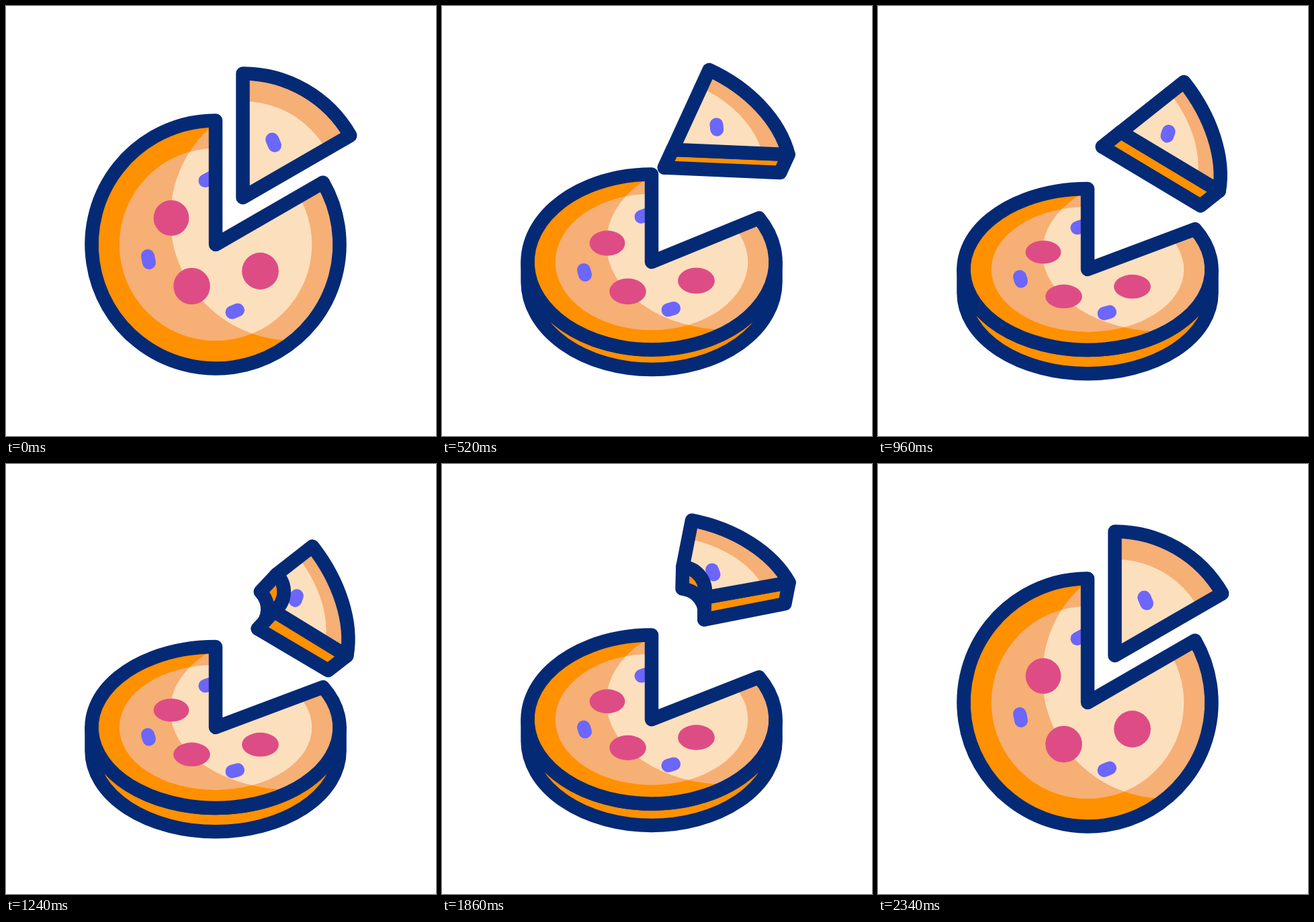
Recreate the animation shown at these times as an HTML page with a canvas. Size 640 by 640 pixels, loop 2400 ms.

```html
<!DOCTYPE html>
<html lang="en">
<head>
<meta charset="utf-8">
<title>Pizza</title>
<style>
  html, body { margin: 0; width: 100%; height: 100%; overflow: hidden; background: #fff; }
  canvas { display: block; }
</style>
</head>
<body>
<canvas id="stage" width="640" height="640"></canvas>
<script>
const ctx = document.getElementById('stage').getContext('2d');
const LOOP = 2400, RADIUS = 184.5, CHEESE = 143.3, LINE = 20.5, THICKNESS = 35.3;
const NAVY = '#042a76', CRUST = '#ff9000', TAN = '#f6af74', CREAM = '#fcdfbd',
      PINK = '#de4c85', BLUE = '#6c66fa';
const UP = -Math.PI / 2, RIGHT = -Math.PI / 6, TAU = Math.PI * 2;
const EDGE_X = RADIUS * Math.cos(RIGHT), EDGE_Y = RADIUS * Math.sin(RIGHT);

let squash = 1, depth = 0;

function ease(t, start, end) {
  const u = Math.min(1, Math.max(0, (t - start) / (end - start)));
  return u * u * (3 - 2 * u);
}

// Path helpers work in flat pizza coordinates; only y is squashed, line widths stay.
const arc = (path, r, from, to, ccw = false, dy = 0) =>
  path.ellipse(0, dy, r, r * squash, 0, from, to, ccw);

function disc(x, y, r, color) {
  ctx.fillStyle = color;
  ctx.beginPath();
  ctx.ellipse(x, y * squash, r, r * squash, 0, 0, TAU);
  ctx.fill();
}

function pill(x1, y1, x2, y2) {
  ctx.strokeStyle = BLUE;
  ctx.lineWidth = 20;
  ctx.beginPath();
  ctx.moveTo(x1, y1 * squash);
  ctx.lineTo(x2, y2 * squash);
  ctx.stroke();
}

function outline(path) {
  ctx.strokeStyle = NAVY;
  ctx.lineWidth = LINE;
  ctx.stroke(path);
}

function wall(path) {
  path.closePath();
  ctx.fillStyle = CRUST;
  ctx.fill(path);
  outline(path);
}

function topFace(path, drawInside) {
  path.closePath();
  ctx.save();
  ctx.clip(path);
  drawInside();
  ctx.restore();
  outline(path);
}

function drawPizza(y) {
  ctx.save();
  ctx.translate(312, y);

  if (depth > 0.1) {
    const side = new Path2D();
    arc(side, RADIUS, Math.PI, 0, true);
    arc(side, RADIUS, 0, Math.PI, false, depth);
    wall(side);
  }

  const face = new Path2D();
  face.moveTo(0, 0);
  arc(face, RADIUS, RIGHT, UP + TAU);
  topFace(face, () => {
    disc(0, 0, RADIUS, CRUST);
    disc(0, 0, CHEESE, TAN);
    const light = new Path2D();
    light.ellipse(115, -39.5 * squash, 182.5, 182.5 * squash, 0, 0, TAU);
    ctx.save();
    ctx.clip(light);
    disc(0, 0, RADIUS, TAN);
    disc(0, 0, CHEESE, CREAM);
    ctx.restore();
    disc(-66, -39.5, 26.4, PINK);
    disc(-35.5, 62, 27.3, PINK);
    disc(66.5, 39.5, 27.4, PINK);
    pill(-101, 17, -99, 27);
    pill(24.5, 101, 33, 97.5);
    pill(-15.5, -95, -6, -100);
  });
  ctx.restore();
}

function drawSlice(x, y, angle, bite) {
  ctx.save();
  ctx.translate(x, y);
  ctx.rotate(angle);
  ctx.translate(-80, 92 * squash);

  const at = (px, py, low = 0) =>
    [px * bite + low * 5.5 * bite, py * bite * squash + low * depth];
  const left = low => at(0, -81, low);
  const front = low => at(41, -24, low);
  const bend1 = low => at(22, -84, low);
  const bend2 = low => at(41, -60, low);

  if (depth > 0.1) {
    const bitten = new Path2D();
    bitten.moveTo(...left(0));
    bitten.bezierCurveTo(...bend1(0), ...bend2(0), ...front(0));
    bitten.lineTo(...front(1));
    bitten.bezierCurveTo(...bend2(1), ...bend1(1), ...left(1));
    wall(bitten);

    const side = new Path2D();
    side.moveTo(...front(0));
    side.lineTo(EDGE_X, EDGE_Y * squash);
    side.lineTo(EDGE_X, EDGE_Y * squash + depth);
    side.lineTo(...front(1));
    wall(side);
  }

  const face = new Path2D();
  arc(face, RADIUS, UP, RIGHT);
  face.lineTo(...front(0));
  face.bezierCurveTo(...bend2(0), ...bend1(0), ...left(0));
  topFace(face, () => {
    disc(0, 0, RADIUS, TAN);
    disc(0, 0, CHEESE, CREAM);
    pill(43.7, -86.5, 47.5, -77.5);
  });
  ctx.restore();
}

function draw(now) {
  const t = now % LOOP;
  const there = (a, b, c, d) => ease(t, a, b) - ease(t, c, d);
  const tilt = there(100, 667, 1757, 2330);
  squash = 1 - 0.35 * tilt;
  depth = THICKNESS * tilt;

  ctx.fillStyle = '#fff';
  ctx.fillRect(0, 0, 640, 640);
  ctx.lineCap = ctx.lineJoin = 'round';

  drawPizza(355 + 37 * there(100, 760, 1570, 2340));

  const sliceX = 432.5 + 25.5 * there(203, 923, 1334, 2096);
  const sliceY = 193 - 5 * ease(t, 100, 380) + 35 * ease(t, 560, 1180)
    - 69 * ease(t, 1220, 1720) + 39 * ease(t, 1720, 2240);
  const angle = 52 * there(60, 1015, 1230, 2130) * Math.PI / 180;
  drawSlice(sliceX, sliceY, angle, there(1040, 1140, 1900, 2200));

  requestAnimationFrame(() => draw(performance.now() - start));
}

const start = performance.now();
draw(0);
</script>
</body>
</html>
```
